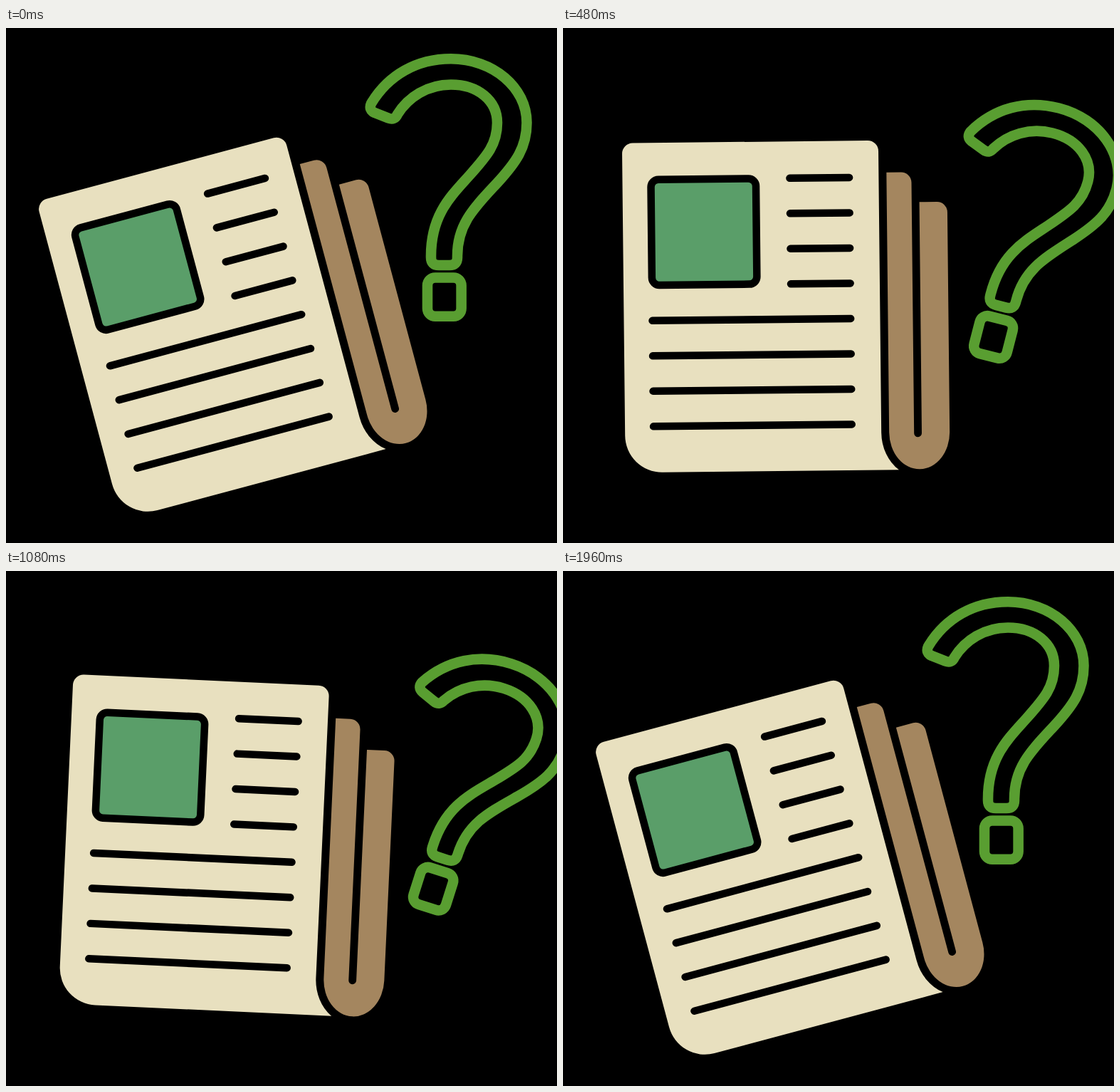
These frames come from a looping animation (774x723 px, 2000 ms). An HTML page:

```html
<!DOCTYPE html>
<html lang="en">
<head>
<meta charset="utf-8">
<title>Newspaper and question mark</title>
<style>
  html, body { margin: 0; width: 100%; height: 100%; overflow: hidden; background: #000; }
  svg { display: block; width: 774px; height: 723px; }
  .ink { stroke: #000; stroke-width: 10.5; stroke-linecap: round; }
  .mark { fill: none; stroke: #599e31; stroke-width: 14.6; stroke-linejoin: round; }
</style>
</head>
<body>
<svg viewBox="0 0 774 723">
  <g id="scene">
    <g transform="translate(387 361.5) rotate(-15)">
      <path fill="#e8e0bf" d="M-302 -188 a15 15 0 0 1 15 -15 H43 a15 15 0 0 1 15 15 V207
        A53.5 63 0 0 0 82.2 259.7 H-250 a52 52 0 0 1 -52 -52 Z"/>
      <path fill="#a4865f" d="M69 -158 H89.5 a14.5 14.5 0 0 1 14.5 14.5 V208.5
        a5.4 5.4 0 0 0 10.8 0 V-116 H139.5 a14.5 14.5 0 0 1 14.5 14.5 V207
        A42.5 52 0 0 1 69 207 Z"/>
      <rect class="ink" fill="#5a9e69" x="-262" y="-151.4" width="147.5" height="148.2" rx="10.5"/>
      <g id="lines" class="ink"></g>
    </g>
    <path class="mark" d="M513 106 C537 66 577 43.3 625 43.3 C684 43.3 731.5 83.5 731.5 133
      C731.5 168 716 189 690 217.5 C658 252 634 275 634 320 V322 Q634 333 623 333
      H608 Q597 333 597 322 V320 C597 262 625 236 651 207 C676 179 690 163 690 133
      C690 102 663 79.5 625 79.5 C592 79.5 565 97 550 121 Q546 130 537 126.5
      L518 119 Q509 115 513 106 Z"/>
    <rect class="mark" x="592" y="350.5" width="47.6" height="54.2" rx="11"/>
  </g>
</svg>
<script>
  const LOOP = 2000, TICK = 40;
  // [time in ms, angle in degrees]: slow tilt, quick return, rest
  const steps = [[0, 0], [980, 29.4], [1000, 29.4], [1200, 0], [LOOP, 0]];

  const scene = document.getElementById('scene');
  const lines = document.getElementById('lines');

  for (let row = 0; row < 8; row++) {
    const line = document.createElementNS('http://www.w3.org/2000/svg', 'line');
    const y = -151.4 + row * 49.5;
    const ends = { x1: row < 4 ? -67 : -262, y1: y, x2: 16.7, y2: y };
    for (const key in ends) line.setAttribute(key, ends[key]);
    lines.append(line);
  }

  function angleAt(time) {
    const next = steps.findIndex(([end]) => time < end);
    const [t0, a0] = steps[next - 1], [t1, a1] = steps[next];
    return a0 + (a1 - a0) * (time - t0) / (t1 - t0);
  }

  const start = performance.now();
  function draw() {
    const time = (performance.now() - start) % LOOP;
    const held = Math.floor(time / TICK) * TICK;
    scene.setAttribute('transform', `rotate(${angleAt(held)} 387 361.5)`);
    requestAnimationFrame(draw);
  }
  draw();
</script>
</body>
</html>
```
